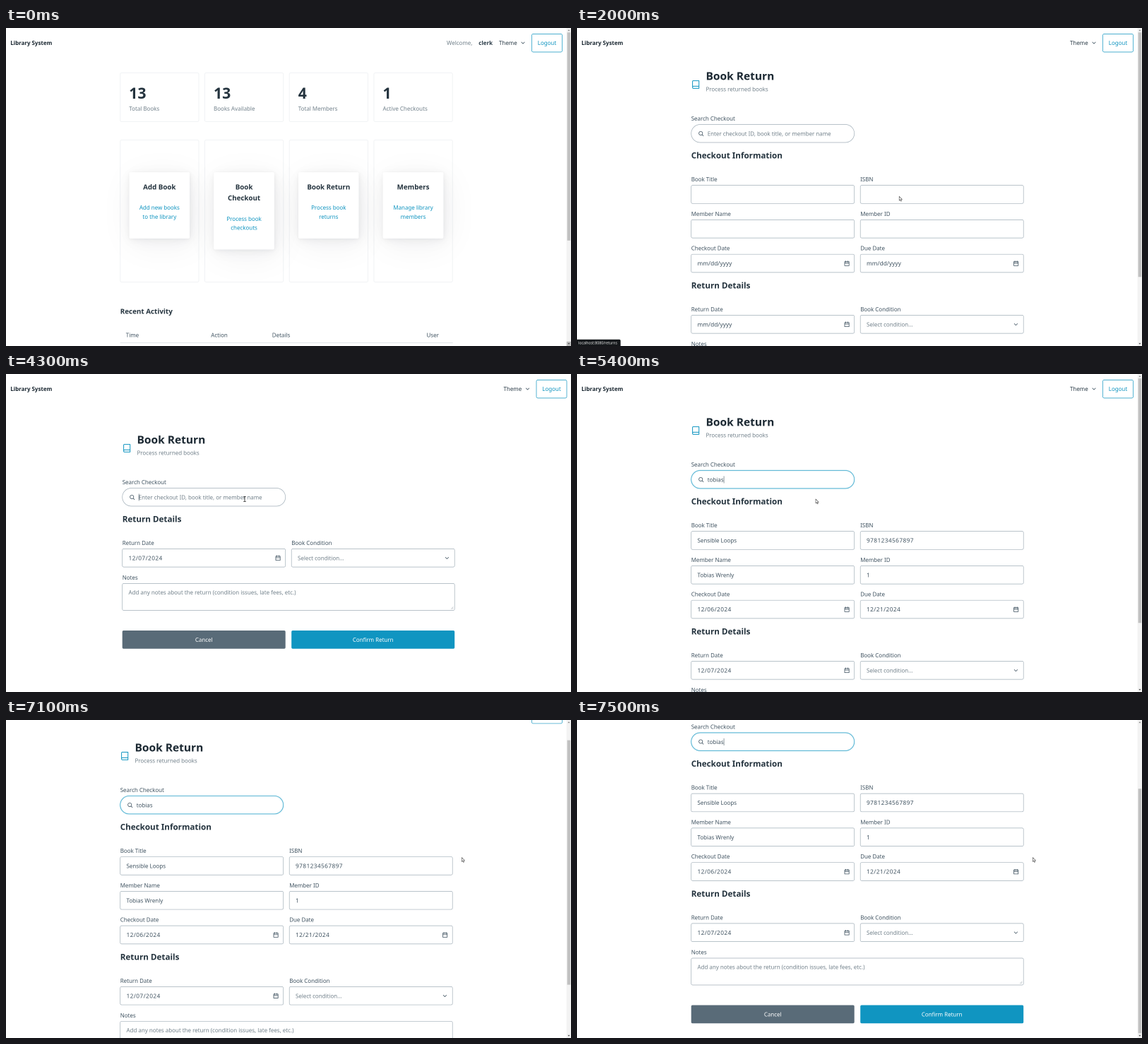
Recreate the animation shown at these times as an HTML page with a canvas. Size 800 by 450 pixels, loop 8000 ms.

```html
<!DOCTYPE html>
<html lang="en">
<head>
<meta charset="utf-8">
<title>Library System</title>
<style>
  html, body { margin: 0; width: 100%; height: 100%; overflow: hidden; background: #fff; }
  canvas { display: block; width: 800px; height: 450px; }
</style>
</head>
<body>
<canvas></canvas>
<script>
const LOOP = 8000, STEP = 100;
// Drawn at double size and shown reduced, for soft thin lines and unhinted text
const SCALE = 2;
const canvas = document.querySelector('canvas');
canvas.width = 800 * SCALE;
canvas.height = 450 * SCALE;
const ctx = canvas.getContext('2d');
ctx.scale(SCALE, SCALE);

const INK = '#1b2832', HEAD = '#24333e', BODY = '#415462', MUTED = '#73828c',
      BLUE = '#1095c1', LINE = '#a2afb9', FAINT = '#f1f3f5';
const SIZE = 7.95, DIGIT_SIZE = 8.3, COL_W = 231, COL_2 = 239.5;
const SEARCH = 'tobias';

const clamp = v => Math.max(0, Math.min(1, v));

// y is the optical middle of the line of text
function text(str, x, y, color = BODY, { size = SIZE, bold = false, align = 'left', gap = 0 } = {}) {
  ctx.font = `${bold ? 700 : 400} ${size}px "Noto Sans", "Open Sans", sans-serif`;
  ctx.letterSpacing = gap + 'px';
  ctx.textAlign = align;
  ctx.fillStyle = color;
  ctx.fillText(str, x, y + size * .365);
  return ctx.measureText(str).width;
}

function box(x, y, w, h, { r = 2, fill, stroke, width = .7 } = {}) {
  ctx.beginPath();
  ctx.roundRect(x, y, w, h, r);
  if (fill) { ctx.fillStyle = fill; ctx.fill(); }
  if (stroke) { ctx.strokeStyle = stroke; ctx.lineWidth = width; ctx.stroke(); }
}

function shape(d, x, y, { fill, stroke, width = 1 }) {
  ctx.save();
  ctx.translate(x, y);
  ctx.lineCap = ctx.lineJoin = 'round';
  const path = new Path2D(d);
  if (fill) { ctx.fillStyle = fill; ctx.fill(path); }
  if (stroke) { ctx.strokeStyle = stroke; ctx.lineWidth = width; ctx.stroke(path); }
  ctx.restore();
}

const chevron = (x, y) => shape('M-2.2-1 0 1.2 2.2-1', x, y, { stroke: BODY, width: .8 });

function header(dx) {
  text('Library System', 6.2, 21, INK, { bold: true });
  text('Theme', 698 + dx, 21, '#2c3d49');
  chevron(732 + dx, 21);
  box(744.5 + dx, 8.5, 43, 25.5, { stroke: BLUE });
  text('Logout', 766 + dx, 21, BLUE, { align: 'center' });
}

function scrollbar(top, height, pressed) {
  box(793.7, 0, 6.3, 450, { r: 0, fill: '#f3f3f3' });
  if (pressed) box(793.7, 443.7, 6.3, 6.3, { r: 0, fill: '#bdbdbd' });
  box(794.6, top, 4.6, height, { r: 0, fill: '#c1c1c1' });
  shape('M-1.6 .9 0-.9 1.6 .9Z', 796.9, 3.2, { fill: '#8a8a8a' });
  shape('M-1.6-.9 0 .9 1.6-.9Z', 796.9, 446.8, { fill: '#505050' });
}

function cardShadow(x, y, w, h) {
  // blur, alpha; each layer is offset in proportion to its blur
  for (const [blur, alpha] of [[50, .06], [21, .043], [11, .036], [6, .03], [3, .024]]) {
    ctx.save();
    ctx.shadowColor = `rgba(27,40,50,${alpha})`;
    ctx.shadowBlur = blur * SCALE;
    ctx.shadowOffsetX = blur / 12 * SCALE;
    ctx.shadowOffsetY = blur / 6 * SCALE;
    box(x, y, w, h, { fill: '#fff' });
    ctx.restore();
  }
}

const STATS = [['13', 'Total Books'], ['13', 'Books Available'], ['4', 'Total Members'], ['1', 'Active Checkouts']];
const CARDS = [
  [['Add Book'], ['Add new books', 'to the library']],
  [['Book', 'Checkout'], ['Process book', 'checkouts']],
  [['Book Return'], ['Process book', 'returns']],
  [['Members'], ['Manage library', 'members']],
];

function dashboard(t) {
  header(0);
  text('Welcome,', 624, 21, MUTED);
  text('clerk', 689, 21, '#2c3d49', { bold: true, align: 'right' });

  const lift = [0, 0, clamp((t - 1100) / 200) * .8, t < 900 ? 0 : clamp((1200 - t) / 300) * .8];
  for (let i = 0; i < 4; i++) {
    const x = 161.7 + i * 119.75;
    box(x, 63.5, 111.3, 69, { stroke: FAINT, width: 1 });
    text(STATS[i][0], x + 12.6, 92.3, HEAD, { size: 21.2, bold: true });
    text(STATS[i][1], x + 12.6, 114, MUTED);
    box(x, 158.5, 111.3, 201, { stroke: FAINT, width: 1 });
  }
  CARDS.forEach(([title, lines], i) => {
    const x = 174.5 + i * 119.75, y = 204.3 - lift[i], mid = x + 42.8;
    const extra = (title.length - 1) * 15.6;
    cardShadow(x, y, 85.5, 93.5 + extra);
    title.forEach((s, n) => text(s, mid, y + 20.5 + n * 15.6, HEAD, { size: 9.75, bold: true, align: 'center' }));
    lines.forEach((s, n) => text(s, mid, y + 50 + extra + n * 12.6, BLUE, { align: 'center' }));
  });

  text('Recent Activity', 161.7, 401, HEAD, { size: 9.85, bold: true });
  [['Time', 169.8], ['Action', 290.3], ['Details', 376.8], ['User', 595.5]].forEach(([s, x]) => text(s, x, 434.6));
  box(161.7, 445, 471, 1, { r: 0, fill: '#dfe3e7' });
  scrollbar(6.3, 294.5, t < 300);
}

function field(label, value, x, y, icon, color = BODY) {
  text(label, x, y - 8.5);
  box(x, y, COL_W, 25.7, { stroke: LINE });
  const numeric = /^[\d/]+$/.test(value);
  const size = numeric || icon === 'date' ? DIGIT_SIZE : SIZE;
  text(value, x + 8.8, y + 13, color, { size, gap: numeric ? .4 : 0 });
  if (icon === 'date') {
    shape('M-3.1-2.4H3.1V3.3H-3.1ZM-3.1-.3H3.1M-1.5-3.5V-1.7M1.5-3.5V-1.7', x + 220.4, y + 12.9, { stroke: BODY, width: .8 });
  }
  if (icon === 'select') chevron(x + 220.2, y + 13);
}

const heading = (s, y) => text(s, 0, y, HEAD, { size: 11.65, bold: true });

function returnPage({ t, compact, filled, scroll }) {
  const date = s => filled ? s : 'mm/dd/yyyy';
  const value = s => filled ? s : '';

  ctx.save();
  ctx.translate(0, -scroll);
  header(compact ? 6.5 : 0);
  ctx.translate(compact ? 164.7 : 161.7, compact ? 25 : 0);

  shape('M2.6 74.6H11V85.4H2.9A1.4 1.4 0 0 1 1.9 84V75.5A1 1 0 0 1 2.6 74.6M1.9 84A1.4 1.4 0 0 1 3.2 82.4H11', 0, 0,
    { stroke: BLUE, width: 1 });
  text('Book Return', 20.8, 68, INK, { size: 15.5, bold: true });
  text('Process returned books', 20.8, 86.5, MUTED);

  text('Search Checkout', 0, 128);
  const focus = clamp((t - 4300) / 300);
  box(0, 136.5, COL_W, 25.5, { r: 12.75, fill: '#fff', stroke: LINE });
  if (focus) {
    ctx.globalAlpha = focus;
    box(0, 136.5, COL_W, 25.5, { r: 12.75, stroke: '#cfeaf3', width: 1.8 });
    box(0, 136.5, COL_W, 25.5, { r: 12.75, stroke: '#3fabce' });
    ctx.globalAlpha = 1;
  }
  shape('M2.6 0A2.6 2.6 0 1 1-2.6 0A2.6 2.6 0 1 1 2.6 0M1.9 1.9 3.7 3.7', 13.5, 149, { stroke: BODY, width: .8 });
  const typed = SEARCH.slice(0, Math.floor(clamp((t - 4700) / 400) * SEARCH.length));
  const typedWidth = text(typed, 23, 149.4);
  if (!typed) text('Enter checkout ID, book title, or member name', 23, 149.4, MUTED);
  const blink = t < 5100 ? 0 : Math.floor((t - 5100) / 600) % 2;
  if (t >= 4300 && !blink) box(23.2 + typedWidth, 144.5, .6, 10, { r: 0, fill: BODY });

  if (!compact) {
    heading('Checkout Information', 180.4);
    field('Book Title', value('Sensible Loops'), 0, 222.6);
    field('ISBN', value('9781234567897'), COL_2, 222.6);
    field('Member Name', value('Tobias Wrenly'), 0, 271.4);
    field('Member ID', value('1'), COL_2, 271.4);
    field('Checkout Date', date('12/06/2024'), 0, 320.2, 'date');
    field('Due Date', date('12/21/2024'), COL_2, 320.2, 'date');
  } else {
    ctx.translate(0, -184);
  }

  heading('Return Details', 364.2);
  field('Return Date', date('12/07/2024'), 0, 406.4, 'date');
  field('Book Condition', 'Select condition...', COL_2, 406.4, 'select', MUTED);
  text('Notes', 0, 447);
  box(0, 455.5, 470.5, 38, { stroke: LINE });
  text('Add any notes about the return (condition issues, late fees, etc.)', 8.8, 468.3, MUTED);
  shape('M0 3 3 0M1.7 3 3 1.7', 465.5, 488.5, { stroke: '#8b979f', width: .5 });
  box(0, 522, COL_W, 25.7, { fill: '#596b78' });
  text('Cancel', COL_W / 2, 535, '#fff', { align: 'center' });
  box(COL_2, 522, COL_W, 25.7, { fill: BLUE });
  text('Confirm Return', COL_2 + COL_W / 2, 535, '#fff', { align: 'center' });
  ctx.restore();

  if (!compact) scrollbar(6.3 + scroll * .768, 346, false);
}

function statusBar() {
  box(0, 440.8, 61.7, 9.2, { r: [0, 2, 0, 0], fill: '#15181b' });
  text('localhost:8080/returns', 2, 445.4, '#f1f1f1', { size: 5.2 });
}

// time, x, y of the pointer's hot spot
const PATH = [
  [300, 785, 435], [400, 712, 374], [500, 659, 334], [700, 659, 334], [900, 578, 322],
  [1000, 517.5, 298.5], [1200, 478, 276], [1400, 460, 250], [1600, 456.2, 238.3], [2500, 456.2, 238.3],
  [2800, 312, 142], [2900, 312, 142], [3400, 330, 168], [3700, 338, 177], [6000, 338, 177],
  [6100, 345.3, 175.2], [6300, 543, 175.5], [6400, 543, 175.5], [6600, 645.3, 194.6], [LOOP, 645.3, 194.6],
];

function pointer(t) {
  if (t < PATH[0][0]) return;
  const i = PATH.findIndex(p => p[0] > t);
  const [t0, x0, y0] = PATH[i - 1], [t1, x1, y1] = PATH[i];
  const u = (t - t0) / (t1 - t0);
  const x = x0 + (x1 - x0) * u, y = y0 + (y1 - y0) * u;

  if (t >= 1200 && t < 1700) {
    shape('M-.6 4V.7Q0-.2.6.7V2.8L3 3.3Q3.8 3.6 3.6 4.6L3 7H-.6L-2.3 4.6Q-2.2 3.7-.6 4.6Z', x, y,
      { fill: '#fff', stroke: '#444', width: .6 });
  } else if (t >= 2900 && t < 5400 && y > 161) {
    shape('M-1.5-3.6Q0-3.6 0-2.8Q0-3.6 1.5-3.6M0-2.8V2.8M-1.5 3.6Q0 3.6 0 2.8Q0 3.6 1.5 3.6', x, y,
      { stroke: '#222', width: .8 });
  } else {
    shape('M0 0V5.8L1.3 4.7 2.3 6.8 3.3 6.3 2.4 4.3H4.2Z', x, y, { fill: '#fff', stroke: '#444', width: .6 });
  }
}

function draw(t) {
  ctx.fillStyle = '#fff';
  ctx.fillRect(0, 0, 800, 450);
  if (t < 2000) {
    dashboard(t);
  } else {
    returnPage({
      t,
      compact: t >= 2600 && t < 5400,
      filled: t >= 2600,
      scroll: 118.5 * (1 - (1 - clamp((t - 7000) / 500)) ** 1.26),
    });
  }
  if (t >= 1300 && t < 2600) statusBar();
  pointer(t);
}

function tick() {
  draw(Math.floor(performance.now() % LOOP / STEP) * STEP);
  requestAnimationFrame(tick);
}
tick();
</script>
</body>
</html>
```
